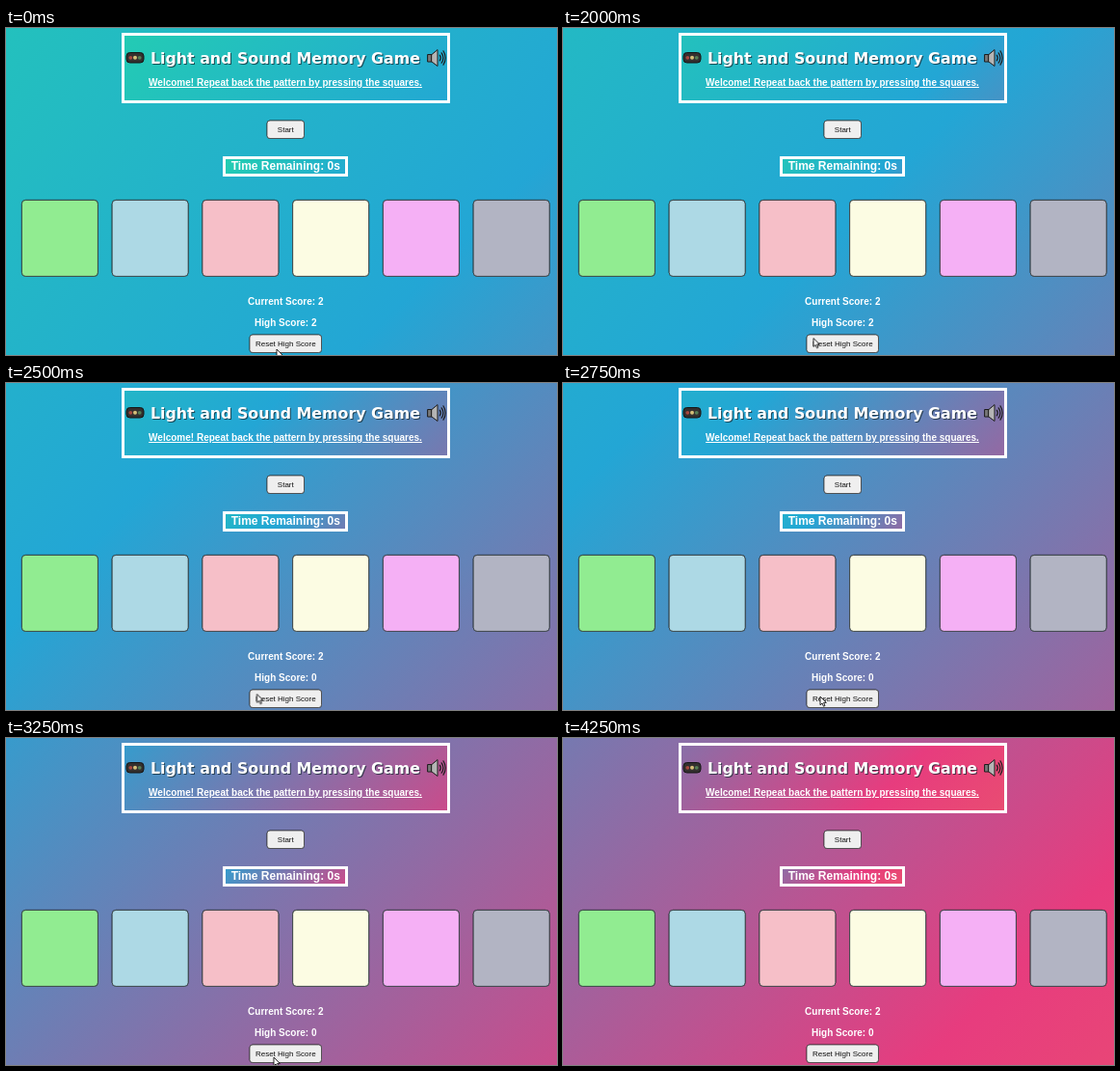
These frames come from a looping animation (572x339 px, 4.5 s). An HTML page:

```html
<!DOCTYPE html>
<html lang="en">
<head>
<meta charset="utf-8">
<title>Light and Sound Memory Game</title>
<style>
html, body { margin: 0; width: 100%; height: 100%; overflow: hidden; }
#stage { position: relative; width: 572px; height: 339px; overflow: hidden; --t: 0s; }

.drift {
  position: absolute;
  box-sizing: border-box;
  background: linear-gradient(-45deg, #ee7752, #e73c7e, #23a6d5, #23d5ab) 0 50% / 400% 400%;
  animation: drift 15s ease infinite paused;
  animation-delay: calc(-13.9s - var(--t));
}
@keyframes drift {
  0%, 100% { background-position: 0% 50%; }
  50% { background-position: 100% 50%; }
}
.page { left: 0; top: 0; width: 581px; height: 342px; }
.header { left: 119.5px; top: 4.5px; width: 341.5px; height: 73.5px; border: 3px solid #fff; }
.timer { left: 225px; top: 133px; width: 130px; height: 21px; border: 3px solid #fff; }

svg { position: absolute; left: 0; top: 0; }
text { font: bold 10px "Liberation Sans", Arial, sans-serif; fill: #fff; text-anchor: middle; }
.title {
  font: bold 15.83px "DejaVu Sans", Verdana, sans-serif;
  filter: drop-shadow(1px 1px .6px rgba(20, 40, 50, .75));
}
.sub { text-decoration: underline; }
.time { font-size: 12px; }
.label { font-weight: normal; font-size: 8px; fill: #111; }
.button { fill: #efefef; stroke: #444; stroke-width: .8; }
.pad { stroke: #3a4448; stroke-width: .9; }
.raised { filter: drop-shadow(.6px .7px .3px rgba(0, 0, 0, .75)); }

#cursor {
  fill: #fff; stroke: #111; stroke-width: .9; stroke-linejoin: round;
  animation: point 4.5s linear infinite paused;
  animation-delay: calc(0s - var(--t));
}
@keyframes point {
  0% { transform: translate(281px, 333px); }
  5.56% { transform: translate(272px, 326px); }
  11.11% { transform: translate(262px, 322px); }
  16.67%, 27.78% { transform: translate(257.5px, 319px); }
  33.33% { transform: translate(259px, 320px); }
  44.44% { transform: translate(260px, 321.5px); }
  55.56% { transform: translate(260.5px, 322.5px); }
  61.11% { transform: translate(267px, 325px); }
  66.67% { transform: translate(275px, 328.5px); }
  72.22% { transform: translate(278px, 331px); }
  83.33% { transform: translate(282.5px, 334.5px); }
  88.89%, 100% { transform: translate(284px, 342px); }
}
</style>
</head>
<body>
<div id="stage">
  <div class="drift page"></div>
  <div class="drift header"></div>
  <div class="drift timer"></div>
  <svg width="572" height="339" viewBox="0 0 572 339">
    <g id="light">
      <rect x="125" y="25.5" width="18" height="10.5" rx="3.6" fill="#33302f" stroke="#151515"/>
      <circle cx="129.3" cy="30.8" r="1.9" fill="#a8483f"/>
      <circle cx="134" cy="30.8" r="2" fill="#d6bf78"/>
      <circle cx="138.7" cy="30.8" r="1.9" fill="#557f55"/>
    </g>
    <g id="speaker" stroke="#1c1c1c" stroke-linejoin="round" stroke-linecap="round">
      <path d="M438 27.5h4v7.5h-4z" fill="#777"/>
      <path d="M442 27.5L448 22.5V39.5L442 35z" fill="#b5b5b5"/>
      <path d="M450.3 28.2q1.9 2.8 0 5.6M452.2 25.8q3.4 5.2 0 10.4M454 23.8q4.4 7.2 0 14.4" fill="none" stroke-width="1.2"/>
    </g>
    <text class="title" x="290" y="36.5">Light and Sound Memory Game</text>
    <text class="sub" x="290" y="60">Welcome! Repeat back the pattern by pressing the squares.</text>

    <rect class="button raised" x="271" y="96" width="38.5" height="18.5" rx="3"/>
    <text class="label" x="290.3" y="108">Start</text>
    <text class="time" x="290.3" y="147">Time Remaining: 0s</text>
    <g id="pads" class="raised"></g>

    <text x="290.3" y="287">Current Score: 2</text>
    <text id="high" x="290.3" y="308.5">High Score: 2</text>
    <rect class="button raised" x="253" y="318" width="74.5" height="18.5" rx="3"/>
    <text class="label" x="290.3" y="330">Reset High Score</text>
    <path id="cursor" d="M0 0V8.8L2.1 7L3.5 10.2L5 9.5L3.6 6.4H6.3Z"/>
  </svg>
</div>
<script>
const LOOP = 4500, STEP = 250, RESET_AT = 2250;
const stage = document.getElementById("stage");
const high = document.getElementById("high");
const colors = ["#91ec91", "#add9e5", "#f6bfc8", "#fcfce3", "#f5b0f5", "#b2b4c3"];

document.getElementById("pads").innerHTML = colors.map((fill, i) =>
  `<rect class="pad" x="${16.4 + i * 93.75}" y="178.4" width="79" height="79" rx="4" fill="${fill}"/>`
).join("");

const start = performance.now();
function draw() {
  const t = Math.floor((performance.now() - start) % LOOP / STEP) * STEP;
  stage.style.setProperty("--t", t / 1000 + "s");
  high.textContent = "High Score: " + (t < RESET_AT ? 2 : 0);
  requestAnimationFrame(draw);
}
draw();
</script>
</body>
</html>
```
